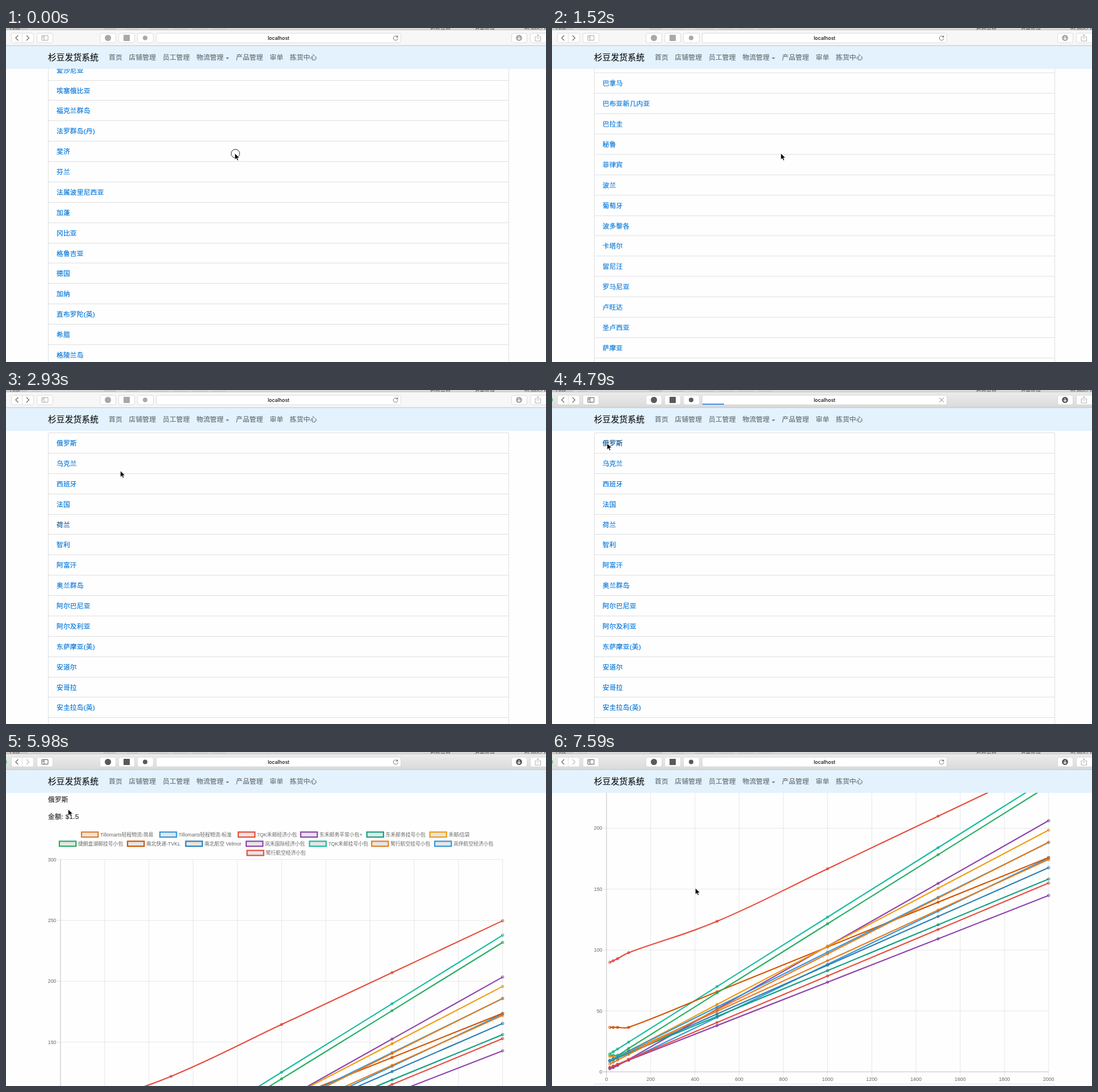
Animation, 951 px wide and 589 px high, one loop 8 s. Source, as an HTML page:

```html
<!DOCTYPE html>
<html lang="zh-CN">
<head>
<meta charset="utf-8">
<title>发货系统</title>
<style>
html, body { margin: 0; width: 100%; height: 100%; overflow: hidden; background: #fefefe; }
body { position: relative; font: 11.72px "Liberation Sans", "Noto Sans CJK SC", "Noto Sans CJK", sans-serif; color: #292b2c;
  letter-spacing: .2px; -webkit-text-stroke: .2px; }
body * { box-sizing: border-box; }
svg { position: absolute; left: 0; top: 0; overflow: visible; letter-spacing: 0; -webkit-text-stroke: 0; }
.anim, .anim * { animation: 8s step-end infinite; }

/* browser toolbar */
#toolbar { --ink: #a8a8a8; animation-name: focus; }
#toolbar .button { fill: #fff; stroke: #d4d4d4; stroke-width: .8; }
#toolbar .icon { fill: none; stroke: var(--ink); stroke-width: 1; }
#toolbar .solid { fill: var(--ink); }
#toolbar .focused { opacity: 0; animation-name: appear; }
#forward { stroke: #666; animation-name: forward; }
#reload { animation-name: reload; }
#stop { opacity: 0; animation-name: stop; }
#progress { fill: #3188f5; width: 0; animation-name: progress; }
@keyframes focus { 0% { --ink: #a8a8a8; } 48.625% { --ink: #5a5a5a; } }
@keyframes appear { 0% { opacity: 0; } 48.625% { opacity: 1; } }
@keyframes forward { 0% { stroke: #666; } 67.25% { stroke: #bbb; } }
@keyframes reload { 0% { opacity: 1; } 58% { opacity: 0; } 72.5% { opacity: 1; } }
@keyframes stop { 0% { opacity: 0; } 58% { opacity: 1; } 72.5% { opacity: 0; } }
@keyframes progress {
  0% { width: 0; } 58% { width: 18px; } 59.875% { width: 38px; } 62.125% { width: 95px; }
  64.75% { width: 180px; } 67.25% { width: 300px; } 69.875% { width: 430px; } 72.5% { width: 0; }
}

/* site navigation */
nav { position: absolute; top: 31px; left: 0; width: 951px; height: 41px; background: #e3f2fd; color: rgba(0,0,0,.5); }
nav span { position: absolute; line-height: 42px; white-space: nowrap; }
nav .brand { left: 74px; font-size: 14.65px; color: rgba(0,0,0,.9); }
nav i { position: absolute; left: 387px; top: 20.5px; border: 3.3px solid transparent; border-top-color: rgba(0,0,0,.5); border-bottom: 0; }

/* country list */
#countries { position: absolute; left: 0; top: 0; animation-name: countries; }
#list { position: absolute; left: 74px; top: 75px; width: 812px; margin: 0; padding: 0; list-style: none;
  border: 1px solid #dfdfdf; border-bottom: 0; border-radius: 3px; color: #0275d8; animation-name: scroll; }
#list li { height: 35.875px; line-height: 35.5px; padding-left: 14px; border-bottom: 1px solid #dfdfdf; }
#list li:last-child { border-radius: 0 0 3px 3px; }
#list li:first-child { animation-name: pick; }
#list li:nth-child(5) { animation-name: graze; }
@keyframes countries { 0% { visibility: visible; } 67.25% { visibility: hidden; } }
@keyframes pick { 0% { color: #0275d8; } 48.625% { color: #014c8c; } }
@keyframes graze { 0% { color: #0275d8; } 30% { color: #014c8c; } 48.625% { color: #0275d8; } }
@keyframes scroll {
  0% { transform: translateY(-2423px); }
  1.75% { transform: translateY(calc(var(--end) * -.364)); }
  4% { transform: translateY(calc(var(--end) * -.53)); }
  6.25% { transform: translateY(calc(var(--end) * -.7)); }
  8.5% { transform: translateY(calc(var(--end) * -.854)); }
  10.75% { transform: translateY(calc(var(--end) * -.955)); }
  13% { transform: translateY(calc(var(--end) * -1)); }
  15.25% { transform: translateY(calc(var(--end) * -.97)); }
  17.125% { transform: translateY(calc(var(--end) * -.88)); }
  19% { transform: translateY(calc(var(--end) * -.74)); }
  20.875% { transform: translateY(calc(var(--end) * -.6)); }
  22.75% { transform: translateY(calc(var(--end) * -.46)); }
  24.625% { transform: translateY(calc(var(--end) * -.33)); }
  26.375% { transform: translateY(-1570px); }
  28.125% { transform: translateY(30px); }
  30% { transform: translateY(12px); }
  32.125% { transform: translateY(3px); }
  34.375% { transform: none; }
}

/* price page */
#prices { position: absolute; left: 0; top: 0; visibility: hidden; animation-name: prices; }
#prices p { position: absolute; left: 74px; margin: 0; line-height: 18px; white-space: nowrap; }
#chart { --grow: 0; font-size: 8.8px; fill: #666; animation-name: grow; }
#chart .line { fill: none; stroke-width: 2.2; vector-effect: non-scaling-stroke;
  transform-origin: 0 834px; transform: scaleY(var(--grow)); }
#chart circle { fill: rgba(0,0,0,.1); transform: translateY(calc(var(--height) * (1 - var(--grow)))); }
@keyframes prices {
  0% { visibility: hidden; transform: none; } 67.25% { visibility: visible; transform: none; }
  88.875% { visibility: visible; transform: translateY(-40px); }
  90.875% { visibility: visible; transform: translateY(-150px); }
  92.875% { visibility: visible; transform: translateY(-245px); }
  94.875% { visibility: visible; transform: translateY(-270px); }
}
@keyframes grow {
  0% { --grow: 0; } 67.25% { --grow: .22; } 69.875% { --grow: .716; } 72.5% { --grow: .927; }
  74.75% { --grow: .987; } 77% { --grow: .999; } 79.25% { --grow: 1; }
}

#cursor { animation-name: pointer; }
#click { fill: none; stroke: #222; animation-name: click; }
@keyframes click { 0% { opacity: 1; } 1.75% { opacity: 0; } 48.625% { opacity: 1; } 52.375% { opacity: 0; } }
@keyframes pointer {
  0% { transform: translate(403px, 221px); }
  32.125% { transform: translate(386px, 214px); }
  34.375% { transform: translate(300px, 180px); }
  36.625% { transform: translate(201.5px, 142.5px); }
  38.875% { transform: translate(140px, 115px); }
  40.875% { transform: translate(108px, 100px); }
  42.875% { transform: translate(97px, 94px); }
  69.875% { transform: translate(104px, 98px); }
  72.5% { transform: translate(109.5px, 101px); }
  77% { transform: translate(160px, 150px); }
  79.25% { transform: translate(230px, 222px); }
  88.875% { transform: translate(252.5px, 240px); }
}
</style>
</head>
<body class="anim">
<div id="countries"><ul id="list"></ul></div>

<div id="prices">
  <p style="top:75px">俄罗斯</p>
  <p style="top:104.5px">金额: $1.5</p>
  <svg id="chart" width="951" height="900"></svg>
</div>

<nav>
  <span class="brand">杉豆发货系统</span>
  <span style="left:181px">首页</span>
  <span style="left:216.5px">店铺管理</span>
  <span style="left:276px">员工管理</span>
  <span style="left:335.5px">物流管理</span><i></i>
  <span style="left:405px">产品管理</span>
  <span style="left:464.5px">审单</span>
  <span style="left:500px">拣货中心</span>
</nav>

<svg id="toolbar" width="951" height="32">
  <linearGradient id="metal" x2="0" y2="1">
    <stop stop-color="#ececec"/><stop offset="1" stop-color="#dadada"/>
  </linearGradient>
  <rect width="951" height="4" fill="#d9d9d9"/>
  <rect width="38" height="4" fill="#c9c9c9"/>
  <rect x="172" width="22" height="4" fill="#cbcbcb"/>
  <path d="M45 2H62M212 2H232M252 2H286M294 2H320M327 2H355M362 2H388" stroke="#c4c4c4"/>
  <g font-size="9" fill="#555">
    <text x="7" y="4">Qua</text><text x="747" y="4">看板电商</text>
    <text x="825" y="4">清单跨境</text><text x="913" y="4">ROMA2.PD</text>
  </g>
  <rect y="3.5" width="951" height="27.5" fill="#f7f7f7"/>
  <rect class="focused" y="3.5" width="951" height="27.5" fill="url(#metal)"/>
  <path d="M0 3.5H951" stroke="#bdbdbd" stroke-width=".8"/>
  <path d="M0 31H951" stroke="#c2c2c2"/>
  <circle class="focused" cx="-3" cy="17.5" r="4.5" fill="#35c84a"/>
  <g class="button" id="buttons"></g>
  <path d="M28.5 9V26" stroke="#d4d4d4" stroke-width=".8"/>
  <path d="M21.5 13 17 17.5 21.5 22" fill="none" stroke="#666" stroke-width="1.2"/>
  <path id="forward" d="M36 13 40.5 17.5 36 22" fill="none" stroke-width="1.2"/>
  <path class="icon" d="M63 13.5H74V21.5H63ZM67 13.5V21.5M64.3 15.5H66M64.3 17.5H66"/>
  <circle class="solid" cx="179.5" cy="17.5" r="5.5"/>
  <rect class="solid" x="207" y="12" width="11" height="11" rx="1"/>
  <circle class="solid" cx="245" cy="17.5" r="4"/>
  <text x="480" y="21" text-anchor="middle" font-size="8.8" font-weight="500" font-family="Inter, sans-serif" fill="#111">localhost</text>
  <g id="reload"><path d="M689.2 15.5A3.9 3.9 0 1 0 690 18" fill="none" stroke="#777"/><path d="M690.3 12.8V16.5H686.6Z" fill="#777"/></g>
  <path id="stop" d="M682.3 13.6 690 21.3M690 13.6 682.3 21.3" stroke="#777"/>
  <rect id="progress" x="265" y="24" height="1.8"/>
  <circle class="solid" cx="903.5" cy="17.5" r="5.4"/>
  <path d="M903.5 14.5V20M901 17.8 903.5 20.3 906 17.8" fill="none" stroke="#fff" stroke-width="1.2"/>
  <path d="M934.5 15.5H932V23H941.5V15.5H939M936.8 19.5V11.5M934.5 13.7 936.8 11.5 939 13.7" fill="none" stroke="#b0b0b0"/>
</svg>

<svg id="cursor" width="20" height="20">
  <circle id="click" cx="1" cy="0.5" r="7.5"/>
  <path d="M0 0V11.2L2.6 8.8 4.4 12.8 6.3 12 4.6 8.1H8Z" fill="#000" stroke="#fff" stroke-width=".7"/>
</svg>

<script>
const countries = `俄罗斯 乌克兰 西班牙 法国 荷兰 智利 阿富汗 奥兰群岛 阿尔巴尼亚 阿尔及利亚 东萨摩亚(美) 安道尔 安哥拉 安圭拉岛(英)
安提瓜和巴布达 阿根廷 亚美尼亚 阿鲁巴 澳大利亚 奥地利 阿塞拜疆 巴哈马 巴林 孟加拉国 巴巴多斯 白俄罗斯 比利时 伯利兹 贝宁 百慕大
不丹 玻利维亚 波黑 博茨瓦纳 巴西 文莱 保加利亚 布基纳法索 布隆迪 柬埔寨 喀麦隆 加拿大 佛得角 开曼群岛 中非 乍得 圣诞岛 科科斯岛
哥伦比亚 科摩罗 刚果 科克群岛(新) 哥斯达黎加 克罗地亚 古巴 塞浦路斯 捷克 刚果(金) 丹麦 吉布提 多米尼克 多米尼加 厄瓜多尔 埃及
萨尔瓦多 赤道几内亚 厄立特里亚 爱沙尼亚 埃塞俄比亚 福克兰群岛 法罗群岛(丹) 斐济 芬兰 法属波里尼西亚 加蓬 冈比亚 格鲁吉亚 德国 加纳
直布罗陀(英) 希腊 格陵兰岛 格林纳达 瓜德罗普 关岛 危地马拉 根西岛 几内亚 几内亚比绍 圭亚那 海地 洪都拉斯 匈牙利 冰岛 印度
印度尼西亚 伊朗 伊拉克 爱尔兰 马恩岛 以色列 意大利 牙买加 日本 泽西岛 约旦 哈萨克斯坦 肯尼亚 基里巴斯 韩国 科威特 吉尔吉斯斯坦
老挝 拉脱维亚 黎巴嫩 莱索托 利比里亚 利比亚 列支敦士登 立陶宛 卢森堡 马其顿 马达加斯加 马拉维 马来西亚 马尔代夫 马里 马耳他
马绍尔群岛 马提尼克 毛里塔尼亚 毛里求斯 马约特 墨西哥 密克罗尼西亚 摩尔多瓦 摩纳哥 蒙古 蒙特塞拉特 摩洛哥 莫桑比克 缅甸 纳米比亚
瑙鲁 尼泊尔 新喀里多尼亚 新西兰 尼加拉瓜 尼日尔 尼日利亚 纽埃 诺福克岛 挪威 阿曼 巴基斯坦 帕劳 巴勒斯坦 巴拿马 巴布亚新几内亚
巴拉圭 秘鲁 菲律宾 波兰 葡萄牙 波多黎各 卡塔尔 留尼汪 罗马尼亚 卢旺达 圣卢西亚 萨摩亚 圣马力诺 沙特阿拉伯 塞内加尔 塞舌尔
塞拉利昂 新加坡 斯洛伐克 斯洛文尼亚 所罗门群岛 索马里 南非 斯里兰卡 苏丹 苏里南 斯威士兰 瑞典 瑞士 叙利亚 塔吉克斯坦 坦桑尼亚
泰国 多哥 托克劳 汤加 突尼斯 土耳其 土库曼斯坦 图瓦卢 乌干达 阿联酋 英国 美国 乌拉圭 乌兹别克斯坦 瓦努阿图 梵蒂冈 委内瑞拉 越南
也门 赞比亚 津巴布韦 阿森松岛(英) 圣巴泰勒米岛 奥尔德尼岛 库拉索 科索沃 圣马丁岛 台湾 香港特别行政区 澳门特别行政区 刚果(金)
黑山 塞尔维亚 东帝汶`.split(/\s+/);
const list = document.getElementById('list');
list.innerHTML = countries.map(name => `<li>${name}</li>`).join('');
list.style.setProperty('--end', Math.round(countries.length * 35.875 - 465.6) + 'px');

const buttons = [[9, 39], [54, 28], [165, 28], [198, 28], [231, 28], [264, 431], [890, 27], [923, 30]];
document.getElementById('buttons').innerHTML = buttons
  .map(([x, width]) => `<rect x="${x + .5}" y="9.2" width="${width}" height="16.8" rx="3"/>`).join('');

// name, colour, legend x, legend row, base price, price per gram, prices of the light parcels
const series = [
  ['Tillomarts轻程物流-简易', '#e67e22', 132, 0, 5.1, .0917],
  ['Tillomarts轻程物流-标准', '#3498db', 270, 0, 8.1, .0901],
  ['7QK禾邮经济小包', '#e74c3c', 408, 0, 2.4, .0763],
  ['东禾邮务平常小包+', '#8e44ad', 518, 0, 2.4, .0712],
  ['东禾邮务挂号小包', '#16a085', 634.5, 0, 7.9, .0752],
  ['禾邮i信袋', '#f39c12', 745.5, 0, 7.6, .0954, [12.5, 12.5, 12.5, 17]],
  ['捷朗盒湖邮挂号小包', '#27ae60', 93, 1, 8, .1135, [13.6, 13.6, 13.6, 19.2]],
  ['南北快递-TVKL', '#d35400', 213, 1, 29, .0735, [36.5, 36.5, 36.5, 36.5]],
  ['南北航空 Velmor', '#2980b9', 315.5, 1, 7.4, .0801],
  ['岚禾国际经济小包', '#8e44ad', 422, 1, 0, .1031, [3, 3.5, 5.2, 10.2]],
  ['7QK禾邮挂号小包', '#1abc9c', 533.5, 1, 13, .114],
  ['鹭行航空挂号小包', '#e67e22', 643, 1, 8.1, .0831],
  ['岚伴航空经济小包', '#3498db', 754, 1, 1.1, .0872],
  ['鹭行航空经济小包', '#e74c3c', 423.5, 2, 80.4, .0863, [89.9, 91.2, 92.9, 97.8]],
];
const weights = [15, 30, 50, 100, 500, 1000, 1500, 2000];
const baseline = 834;
const chartX = grams => 96 + grams * .3893;
const chartY = price => baseline - price * 2.148;
const fixed = n => n.toFixed(2);

// Control points on both sides of a point, with tension 0.4
function handles(points, i) {
  const [x, y] = points[i];
  const prev = points[i - 1] || points[i], next = points[i + 1] || points[i];
  const before = Math.hypot(x - prev[0], y - prev[1]), after = Math.hypot(next[0] - x, next[1] - y);
  const shift = part => part * .4 / (before + after);
  const dx = next[0] - prev[0], dy = next[1] - prev[1];
  return {
    enter: [x - dx * shift(before), y - dy * shift(before)],
    leave: [x + dx * shift(after), y + dy * shift(after)],
  };
}

function curve(points) {
  return points.map((point, i) => i === 0
    ? 'M' + point.map(fixed)
    : 'C' + [...handles(points, i - 1).leave, ...handles(points, i).enter, ...point].map(fixed)).join('');
}

function drawSeries([, color, , , base, rate, light = []]) {
  const points = weights.map((w, i) => [chartX(w), chartY(light[i] ?? base + rate * w)]);
  const dots = points.map(([x, y]) =>
    `<circle cx="${fixed(x)}" cy="${fixed(y)}" r="2.2" stroke="${color}" style="--height:${fixed(baseline - y)}px"/>`);
  return `<path class="line" d="${curve(points)}" stroke="${color}"/>${dots.join('')}`;
}

function drawLegend([name, color, x, row]) {
  const y = 145.6 + row * 16.2;
  return `<rect x="${x + 1}" y="${y - 4.4}" width="29.3" height="8.8" fill="#e5e5e5" stroke="${color}" stroke-width="2.2"/>
    <text x="${x + 34}" y="${y + 3.4}">${name}</text>`;
}

function drawGrid() {
  let svg = '';
  for (let grams = 0; grams <= 2000; grams += 200) {
    const x = chartX(grams);
    svg += `<path d="M${x} 189.6V841" stroke="rgba(0,0,0,${grams ? .12 : .32})" stroke-width=".8"/>
      <text x="${x}" y="849.5" text-anchor="middle">${grams}</text>`;
  }
  for (let price = 0; price <= 300; price += 50) {
    const y = chartY(price);
    svg += `<path d="M89 ${y}H874.6" stroke="rgba(0,0,0,${price ? .12 : .32})" stroke-width=".8"/>
      <text x="88.5" y="${y + 3}" text-anchor="end">${price}</text>`;
  }
  return svg;
}

document.getElementById('chart').innerHTML = drawGrid()
  + series.map(drawLegend).join('')
  + [...series].reverse().map(drawSeries).join('')
  + '<rect x="74.5" y="855.5" width="811" height="60" rx="3" fill="none" stroke="#dfdfdf"/>';
</script>
</body>
</html>
```
